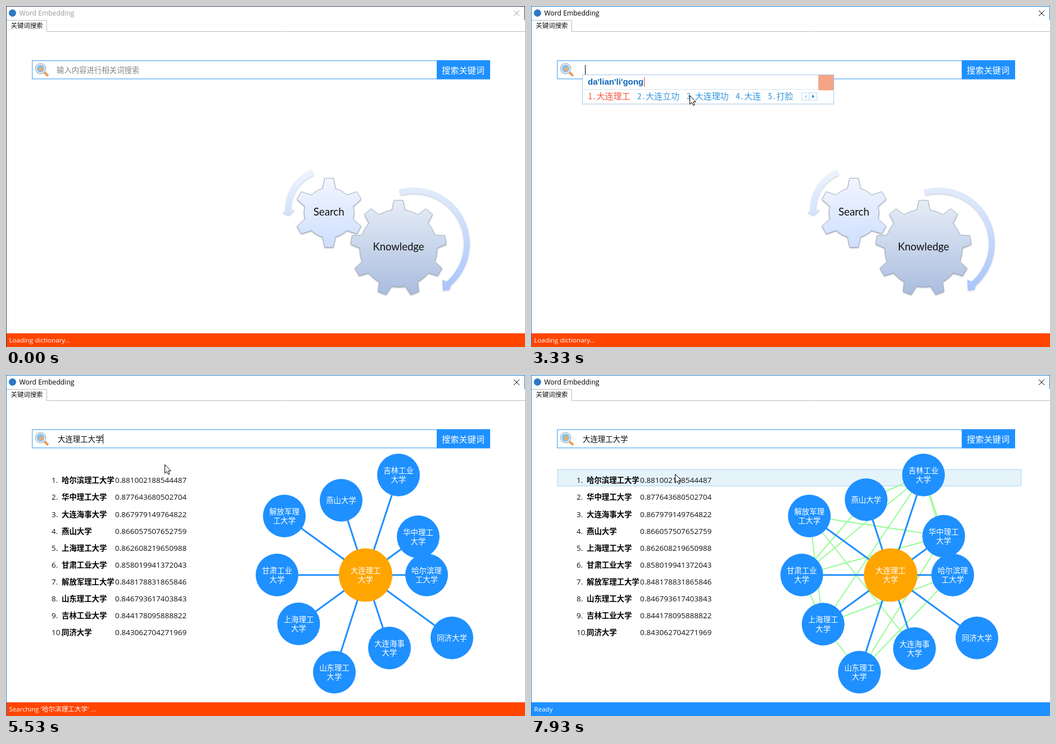
An HTML page with a canvas for the animation above (8000 ms loop, 923 by 607 pixels).

```html
<!DOCTYPE html>
<html lang="zh">
<head>
<meta charset="utf-8">
<title>Word Embedding</title>
<style>
html, body { margin: 0; width: 100%; height: 100%; overflow: hidden; background: #fff; }
canvas { display: block; }
</style>
</head>
<body>
<canvas id="stage" width="923" height="607"></canvas>
<script>
const ctx = document.getElementById('stage').getContext('2d');
const LOOP = 8000, FRAME = 1000 / 15;
const UI = '"Open Sans", "Noto Sans CJK SC", "Noto Sans CJK", sans-serif';
const MONO = '"Noto Sans Mono CJK SC", "Noto Sans CJK SC", "Noto Sans CJK", monospace';
const BLUE = '#1e90ff', ORANGE = '#ff4500';
const QUERY = '大连理工大学';

// name, score, settled x, y, and offset from the settled place while searching
const RESULTS = [
  ['哈尔滨理工大学', '0.881002188544487', 750, 356, -2, 0],
  ['华中理工大学', '0.877643680502704', 734, 287, -1, 1],
  ['大连海事大学', '0.867979149764822', 682, 487, 0, -1],
  ['燕山大学', '0.866057507652759', 596, 222, 0, 1],
  ['上海理工大学', '0.862608219650988', 519.5, 443.5, 1, -0.5],
  ['甘肃工业大学', '0.858019941372043', 481.5, 356, 0.5, 0],
  ['解放军理工大学', '0.848178831865846', 495, 251, 0, 0],
  ['山东理工大学', '0.846793617403843', 584, 529, 0, 0],
  ['吉林工业大学', '0.844178095888822', 698, 178, 0, 0],
  ['同济大学', '0.843062704271969', 793, 468, 0, 0]
];
// pairs of indices into RESULTS
const LINKS = ['83', '85', '81', '80', '84', '35', '61', '62', '64', '51', '54', '47', '40', '71', '70'];

// start time, typed letters, candidates ("*" adds a check mark)
const INPUT = [
  [2270, 'd', '的 大 都 大家 到'],
  [2330, 'da', '大 打 达 大家 搭'],
  [2530, "da'lian", '大连 打脸 大脸 褡裢 (￣ε(#￣)☆╰╮(￣▽￣///)'],
  [2670, "da'lian'l", '大连路 大连 打脸 大脸 大量'],
  [2870, "da'lian'li", '大连理工 大连市里 大连里面 大连 打脸'],
  [3200, "da'lian'li'g", '大连理工 大连立功 大连离港 大连 打脸'],
  [3270, "da'lian'li'go", '大连理工 大连立功 大连离谷 大连 打脸'],
  [3330, "da'lian'li'gong", '大连理工 大连立功 大连理功 大连 打脸'],
  [3530, "da'lian'li'gong'd", '大连理工大学* 大连理工大道 大连理工大厦 大连理工大楼 大连理工大'],
  [3670, "da'lian'li'gong'da", '大连理工大学* 大连理工大道 大连理工大厦 大连理工大楼 大连理工大'],
  [3730, "da'lian'li'gong'da'x", '大连理工大学* 大连理工大学校 大连理工 大连 打脸'],
  [3930, "da'lian'li'gong'da'xeu", '大连理工大学* 大连理工大学额 大连理工 大连 打脸'],
  [4070, '', '']
];
const CARET_ON = [[1130, 1670], [2270, 2730], [3270, 3730], [4130, 4730], [5200, 5730], [6270, 6800], [7270, 7800]];
const SEARCH_STEPS = [5600, 5730, 5870, 5930, 6000, 6070, 6200, 6270];
// start, end, from x, y, to x, y
const MOVES = [
  [267, 600, 878, 594, 322, 236],
  [1067, 1068, 260, 116, 260, 116],
  [1333, 1533, 260, 116, 282, 159],
  [6733, 7067, 282, 159, 300, 209],
  [7733, 7933, 300, 209, 256, 176]
];

function text(str, x, y, size, color, { family = UI, weight = '', align = 'left' } = {}) {
  ctx.font = `${weight} ${size}px ${family}`;
  ctx.textAlign = align;
  ctx.fillStyle = color;
  ctx.fillText(str, x, y);
}

function rect(x, y, w, h, fill, stroke, width = 1) {
  ctx.fillStyle = fill;
  ctx.fillRect(x, y, w, h);
  if (!stroke) return;
  ctx.strokeStyle = stroke;
  ctx.lineWidth = width;
  ctx.strokeRect(x + width / 2, y + width / 2, w - width, h - width);
}

function path(points, { fill, stroke, width = 1, close = true }) {
  ctx.beginPath();
  points.forEach(([x, y]) => ctx.lineTo(x, y));
  if (close) ctx.closePath();
  if (fill) { ctx.fillStyle = fill; ctx.fill(); }
  if (stroke) { ctx.strokeStyle = stroke; ctx.lineWidth = width; ctx.stroke(); }
}

const line = (x1, y1, x2, y2, stroke, width = 1) =>
  path([[x1, y1], [x2, y2]], { stroke, width, close: false });

function disc(x, y, r, fill) {
  ctx.beginPath();
  ctx.arc(x, y, r, 0, Math.PI * 2);
  ctx.fillStyle = fill;
  ctx.fill();
}

function shade(y1, y2, top, bottom) {
  const g = ctx.createLinearGradient(0, y1, 0, y2);
  g.addColorStop(0, top);
  g.addColorStop(1, bottom);
  return g;
}

function withShadow(color, draw) {
  ctx.save();
  ctx.shadowColor = color;
  ctx.shadowBlur = 2.5;
  ctx.shadowOffsetY = 1.5;
  draw();
  ctx.restore();
}

function gear(x, y, teeth, body, outer, fill) {
  ctx.beginPath();
  for (let i = 0; i < teeth; i++) {
    const a = -Math.PI / 2 + i * 2 * Math.PI / teeth;
    const root = Math.asin(11.7 / body), tip = Math.asin(7.8 / outer);
    const at = (r, b) => ctx.lineTo(x + r * Math.cos(b), y + r * Math.sin(b));
    at(body, a - root);
    at(outer, a - tip);
    at(outer, a + tip);
    ctx.arc(x, y, body, a + root, a + 2 * Math.PI / teeth - root);
  }
  ctx.closePath();
  ctx.fillStyle = fill;
  withShadow('rgba(60,75,100,.5)', () => ctx.fill());
  ctx.strokeStyle = '#a3abb8';
  ctx.lineWidth = 1;
  ctx.stroke();
}

function arcArrow(x, y, r, from, to, ccw, head, fill) {
  const rad = Math.PI / 180;
  ctx.beginPath();
  ctx.arc(x, y, r + 5.2, from * rad, to * rad, ccw);
  head.forEach(p => ctx.lineTo(...p));
  ctx.arc(x, y, r - 5.2, to * rad, from * rad, !ccw);
  ctx.closePath();
  ctx.fillStyle = fill;
  withShadow('rgba(90,110,150,.35)', () => ctx.fill());
}

function drawGears() {
  arcArrow(572, 361, 70, -112, -182, true, [[492, 368], [503, 373], [514, 363]],
    shade(290, 374, '#eff5fe', '#d2e1fb'));
  arcArrow(725, 423, 94.5, -105, 49, false, [[789, 505], [777, 506.5], [776, 487]],
    shade(323, 507, '#e2ecfc', '#a8c4fa'));
  gear(574.5, 368, 6, 44.5, 62, shade(306, 430, '#f1f6ff', '#cfdeff'));
  gear(698, 431, 9, 69, 85.5, shade(346, 516, '#e6edf6', '#a9bcdf'));
  const label = { family: 'Lato, sans-serif', align: 'center' };
  text('Search', 574.2, 373, 18.7, '#111', label);
  text('Knowledge', 698, 435, 18.5, '#111', label);
}

function node(name, x, y, r, fill) {
  disc(x, y, r, fill);
  const lines = name.match(/.{1,4}/g);
  lines.forEach((s, i) =>
    text(s, x, y + 5 + (i - (lines.length - 1) / 2) * 16.5, 13.4, '#fff', { align: 'center' }));
}

function drawResults(settled, hover) {
  if (hover >= 0) rect(47, 168 + hover * 30, 825, 30, '#e5f3fb', '#a4d5ee');
  RESULTS.forEach(([name, score], i) => {
    const y = 192.3 + i * 30.1;
    text(`${i + 1}.`, 81, y, 13.5, '#111');
    text(name, 99, y, 13.4, '#000', { weight: 'bold' });
    text(score, 194, y, 13.5, '#111');
  });
  const places = RESULTS.map(([, , x, y, dx, dy]) => settled ? [x, y] : [x + dx, y + dy]);
  if (settled) for (const [a, b] of LINKS) line(...places[a], ...places[b], '#98fb98', 2);
  places.forEach(p => line(639.5, 356, ...p, BLUE, 3));
  places.forEach((p, i) => node(RESULTS[i][0], ...p, 38, BLUE));
  node(QUERY, 639.5, 356, 47.5, '#ffa500');
}

function drawWindow(active) {
  const ink = active ? '#000' : '#999';
  const border = active ? '#1883d7' : '#34405c';
  rect(0, 0, 923, 607, '#fff');
  rect(0, 0, 923, 1, border);
  rect(0, 0, 1, 607, border);
  rect(922, 0, 1, 25, border);
  disc(11.5, 12.5, 6.5, '#2f78c4');
  text('Word Embedding', 23.5, 16.5, 12.15, ink);
  line(903, 8, 913, 18, ink);
  line(913, 8, 903, 18, ink);
  path([[1, 25.5], [72.5, 25.5], [72.5, 45.5], [923, 45.5]], { stroke: '#bcbcbc', close: false });
  text('关键词搜索', 8.5, 39.3, 11.4, '#111');
}

function drawSearchBox(content, color, x) {
  rect(46, 96.6, 815, 33.8, '#fff', '#69b3f7', 1.4);
  line(68, 118, 75, 124.5, '#eb9a4e', 4);
  disc(61.5, 111.5, 10, '#b4bcc4');
  disc(61.5, 111.5, 8.5, '#e0f0fb');
  disc(61.5, 111.5, 6.8, '#86bfe9');
  disc(62.5, 112.5, 3.6, '#eda967');
  text(content, x, 119, 13.4, color);
  rect(766, 96.6, 95, 33.8, BLUE);
  text('搜索关键词', 813, 119.6, 15.2, '#fff', { align: 'center' });
}

const cellWidth = ch => ch === '*' ? 11 : ch < '\x7f' ? 7.5 : 15;
const cellsWidth = str => [...str].reduce((sum, ch) => sum + cellWidth(ch), 0);

// Half-width cells for ASCII, full-width cells for everything else
function cellText(str, x, y, color) {
  for (const ch of str) {
    const w = cellWidth(ch);
    if (ch === '*') {
      ctx.beginPath();
      ctx.arc(x + 5.5, y - 7, 4.5, 0, 7);
      ctx.strokeStyle = color;
      ctx.lineWidth = 1;
      ctx.stroke();
      path([[x + 3, y - 7], [x + 5, y - 5], [x + 9, y - 10]], { stroke: color, close: false });
    } else {
      text(ch, x + w / 2, y, 15, color, { family: MONO, align: 'center' });
    }
    x += w;
  }
}

function drawPopup(typed, candidates) {
  const gap = 12.5;
  const items = candidates.split(' ').map((s, i) => `${i + 1}.${s}`);
  let x = 101.5;
  const end = items.reduce((sum, s) => sum + cellsWidth(s) + gap, x) - gap;
  const right = Math.round(end + 72);
  rect(91, 122, right - 91, 53, '#fff', '#a9c8e2');
  line(92, 148.5, right - 30, 148.5, '#d6e4f0');
  rect(right - 28, 123, 27, 27, '#f4a487');

  text(typed, 101, 140, 15, '#0f66b4', { family: '"Liberation Sans", Arial, sans-serif', weight: 'bold' });
  rect(102 + ctx.measureText(typed).width, 127, 1, 17, '#f0402c');

  items.forEach((s, i) => {
    cellText(s, x, 165.5, i ? '#3596df' : '#f4553f');
    x += cellsWidth(s) + gap;
  });

  const a = right - 58;
  rect(a, 154, 14, 14, '#fff', '#bcd9ef');
  rect(a + 13, 154, 15, 14, '#fff', '#bcd9ef');
  path([[a + 9, 158], [a + 9, 164], [a + 5.5, 161]], { fill: '#a9cdea' });
  path([[a + 19, 157.5], [a + 19, 164.5], [a + 23, 161]], { fill: '#1f8be0' });
}

function drawStatus(t) {
  let message = 'Ready', fill = BLUE;
  if (t < 4870) {
    message = 'Loading dictionary...';
    fill = ORANGE;
  } else if (t >= 5530 && t < 6800) {
    const word = RESULTS[SEARCH_STEPS.filter(s => t >= s).length][0];
    message = `Searching '${word}' ...`;
    fill = ORANGE;
  }
  rect(1, 582.6, 922, 24.4, fill);
  text(message, 5.5, 599, 11.6, '#fff');
}

function pointerAt(t) {
  const move = MOVES.filter(m => t >= m[0]).pop();
  if (!move) return null;
  const [start, end, x1, y1, x2, y2] = move;
  const p = Math.min(1, (t - start) / (end - start));
  return [x1 + (x2 - x1) * p, y1 + (y2 - y1) * p];
}

function drawPointer([x, y], beam) {
  x = Math.round(x);
  y = Math.round(y);
  if (beam) {
    rect(x + 3, y + 1, 1, 15, '#000');
    rect(x, y, 7, 1, '#000');
    rect(x, y + 16, 7, 1, '#000');
    return;
  }
  const outline = [[.5, .5], [.5, 16], [4, 12.7], [6.7, 18], [9, 17], [6.5, 11.8], [11.3, 11.8]];
  path(outline.map(([dx, dy]) => [x + dx, y + dy]), { fill: '#fff', stroke: '#000' });
}

function render(ms) {
  const t = Math.floor((ms + 4) / FRAME) * FRAME + 5;
  const pointer = pointerAt(t);
  const focused = t >= 1130, committed = t >= 4130;

  drawWindow(t >= 1070);
  if (!focused) drawSearchBox('输入内容进行相关词搜索', '#858585', 90);
  else drawSearchBox(committed ? QUERY : '', '#111', 92);
  if (CARET_ON.some(([on, off]) => t >= on && t < off)) rect(committed ? 172 : 96, 105, 1, 17, '#000');

  if (t < 5530) drawGears();
  else drawResults(t >= 6800, t >= 6800 ? Math.floor((pointer[1] - 168) / 30) : -1);

  const input = INPUT.filter(step => t >= step[0]).pop();
  if (input && input[1]) drawPopup(input[1], input[2]);
  drawStatus(t);
  if (pointer) drawPointer(pointer, t >= 1070 && t < 1400);
}

function tick() {
  render(performance.now() % LOOP);
  requestAnimationFrame(tick);
}
tick();
</script>
</body>
</html>
```
